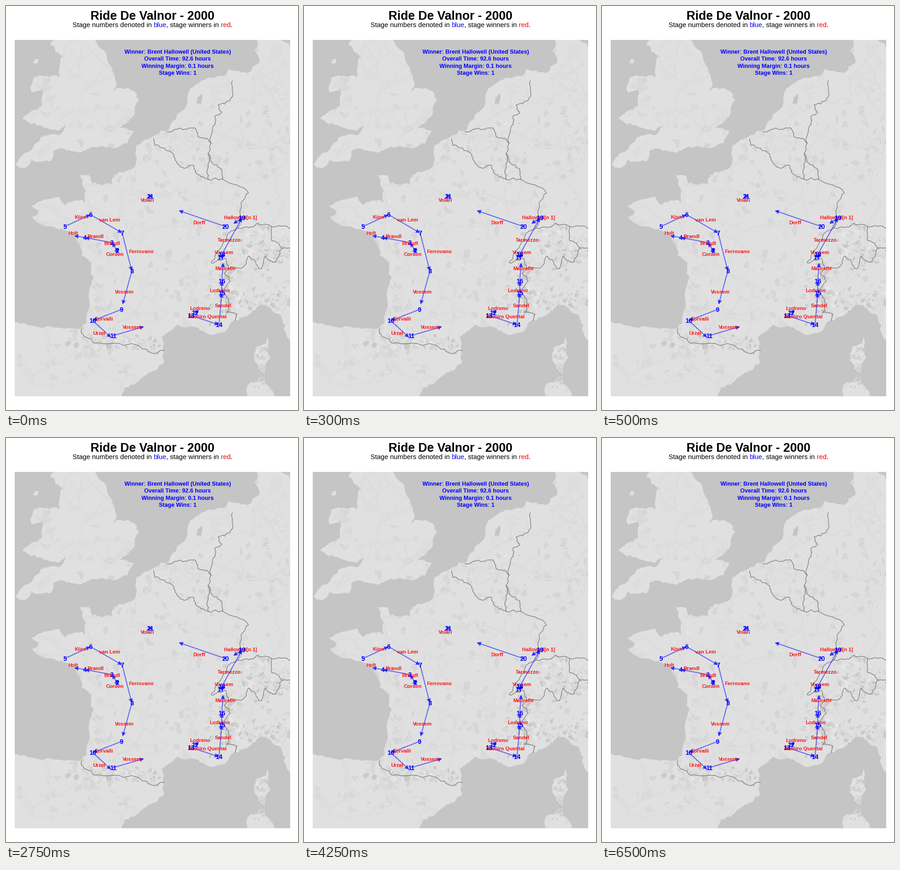
A matplotlib script for the animation above (8 s loop, 636 by 881 pixels).

```python
import numpy as np
import matplotlib.pyplot as plt
from matplotlib.animation import FuncAnimation
from matplotlib.collections import LineCollection, PolyCollection
from matplotlib.patches import PathPatch
from matplotlib.path import Path

W, H = 636, 881
SEA, LAND, BORDER = "#c5c5c5", "#e0e0e0", "#7b7b7b"
rng = np.random.default_rng(7)
plt.rcParams["font.family"] = "Liberation Sans"

# Coasts as (longitude, latitude)
BRITAIN = [
    (-1.3, 54.9), (-.4, 54.3), (.1, 53.6), (.34, 53.15), (.1, 52.85),
    (.5, 52.97), (1.4, 52.86), (1.74, 52.55), (1.3, 51.9), (.5, 51.5),
    (1.4, 51.38), (1, 50.92), (.3, 50.75), (-1.1, 50.8), (-2, 50.6),
    (-2.95, 50.72), (-3.45, 50.6), (-3.65, 50.22), (-4.75, 50.3),
    (-5.2, 49.96), (-5.7, 50.1), (-4.75, 50.67), (-4.2, 51.15), (-3, 51.25),
    (-2.7, 51.57), (-3.2, 51.4), (-4.3, 51.6), (-5.3, 51.85), (-4.1, 52.3),
    (-4.1, 52.9), (-4.7, 52.8), (-4.6, 53.35), (-3.1, 53.35), (-2.85, 54.1),
    (-3.6, 54.5), (-3.4, 54.9)]
NORTH = [
    (10.9, 54.3), (10, 54.75), (8.85, 54.75), (8.6, 54.3), (8.9, 53.87),
    (8.2, 53.5), (7.1, 53.65), (6.85, 53.42), (5.5, 53.25), (4.75, 52.95),
    (4.6, 52.45), (3.5, 51.45), (1.85, 50.96), (1.58, 50.87), (1.5, 50.1),
    (.2, 49.7), (.1, 49.35), (-1.1, 49.38), (-1.27, 49.69), (-1.9, 49.72),
    (-1.5, 48.63), (-2.3, 48.67), (-2.7, 48.52), (-3.1, 48.86),
    (-4.77, 48.5), (-4.3, 48.3), (-4.72, 48.04), (-4.35, 47.82)]
SOUTH = [
    (-2.7, 47.5), (-2.1, 47.2), (-1.75, 46.45), (-1.15, 46.2), (-1.2, 45.7),
    (-.72, 45.3), (-1.1, 45.5), (-1.45, 43.6), (-1.78, 43.37), (-3.8, 43.48),
    (-6, 43.65), (-6, 40), (.3, 40.1), (.85, 40.75), (2.15, 41.32),
    (3.2, 41.85), (3.05, 43), (3.95, 43.53), (5.35, 43.3), (5.95, 43.08),
    (6.6, 43.17), (7.2, 43.65), (8.1, 43.9), (8.9, 44.41), (10.2, 43.95),
    (10.55, 43), (10.9, 42.85)]
CORSICA = [(9.4, 43), (9.55, 42.1), (9.2, 41.37), (8.6, 41.95), (8.7, 42.55),
           (9.3, 42.7)]
SARDINIA = [(8.2, 40.88), (9.2, 41.25), (9.75, 40.5), (9.7, 40), (8.3, 40)]

# Frontiers in stage pixels
LOWLANDS = [
    [(493, 163), (488, 206), (462, 216), (470, 232), (455, 240), (456, 258),
     (447, 299), (440, 322), (452, 345), (470, 357), (472, 378)],
    [(351, 274), (385, 270), (413, 268), (418, 285), (440, 290), (447, 299)],
    [(322, 290), (324, 304), (364, 322), (368, 335), (380, 351), (408, 347),
     (412, 362), (441, 378), (472, 378), (528, 408), (510, 445), (505, 484)],
    [(440, 322), (440, 345), (441, 378)]]
ALPS = [
    [(505, 484), (483, 497), (455, 545), (447, 560), (477, 550), (484, 573),
     (476, 583), (488, 600), (470, 620), (485, 640), (480, 668), (503, 672),
     (500, 686)],
    [(505, 484), (538, 482), (548, 474), (578, 481), (622, 486)],
    [(484, 573), (511, 572), (530, 545), (556, 573), (565, 545), (588, 558),
     (603, 528), (622, 528)],
    [(578, 481), (579, 512), (603, 528)],
    [(165, 704), (172, 722), (193, 735), (266, 738), (315, 756), (345, 751)]]

HUBS = [(224, 270), (313, 408), (158, 225), (385, 290), (480, 285),
        (404, 580), (280, 676), (195, 800), (545, 150), (562, 578)]
# Woodland and relief: centre and spread
WOODS = [(319, 400, 170, 170), (90, 205, 18, 28), (205, 655, 16, 28),
         (425, 345, 25, 18), (560, 300, 45, 70), (360, 620, 35, 40),
         (130, 770, 90, 40)]
HILLS = [(560, 535, 38, 22), (485, 615, 14, 35), (545, 640, 45, 14),
         (240, 735, 55, 9), (560, 770, 11, 35)]

# Stage start, winner, place of the winner's name
ROUTE = [
    (242, 533, "Corden", 237, 541), (242, 533, "Brandl", 231, 517),
    (231, 516, "Brandl", 195, 502), (172, 505, "Holt", 146, 495),
    (128, 481, "Körn", 162, 460), (184, 455, "van Lem", 226, 466),
    (253, 495, "Ferrovano", 294, 535), (274, 578, "Vossem", 258, 623),
    (251, 662, "Corvalli", 213, 682), (189, 686, "Urzel", 203, 713),
    (233, 719, "Vossem", 275, 700), (412, 669, "Lodreno", 422, 659),
    (403, 675, "Ramiro Quental", 439, 677), (464, 695, "Sandel", 473, 653),
    (470, 626, "Lodreno", 465, 620), (470, 600, "Maurelle", 478, 572),
    (468, 548, "Vossem", 475, 537), (470, 542, "Tarmezzo", 486, 510),
    (514, 462, "Hallowell[n 1]", 511, 461), (478, 481, "Dorff", 421, 472),
    (314, 415, "Volari", 308, 423)]
# Finishes that are not the next start
FINISH = {1: (247, 534), 4: (148, 501), 8: (254, 651), 10: (229, 723),
          11: (301, 699), 12: (420, 663), 16: (473, 560), 17: (475, 541),
          19: (495, 475), 20: (376, 446), 21: (320, 415)}


def project(points):
    lon, lat = np.array(points, float).T
    merc = np.degrees(np.arcsinh(np.tan(np.radians(lat))))
    return np.c_[228 + 36.4 * lon, 2453.9 - 36.3 * merc]


def rough(points, amp=.12, depth=3):
    """Subdivide a line with small sideways shifts."""
    p = np.array(points, float)
    for _ in range(depth):
        d = np.diff(p, axis=0)
        shift = np.c_[-d[:, 1], d[:, 0]] * rng.normal(0, amp, (len(d), 1))
        out = np.empty((2 * len(p) - 1, 2))
        out[::2] = p
        out[1::2] = p[:-1] + d / 2 + np.clip(shift, -3, 3)
        p = out
    return p


def coast(points):
    p = project(points)
    return rough(np.vstack([p, p[:1]]))


def blob(x, y, r, n=11):
    a = np.linspace(0, 2 * np.pi, n, endpoint=False)
    rad = r * rng.uniform(.45, 1.25, n)
    turn, flat = rng.uniform(0, np.pi), rng.uniform(.4, .9)
    u, v = rad * np.cos(a), rad * np.sin(a) * flat
    c, s = np.cos(turn), np.sin(turn)
    return np.c_[x + u * c - v * s, y + u * s + v * c]


def scatter(spots, density, small, large, shades):
    shapes, tones = [], []
    for x, y, sx, sy in spots:
        for _ in range(int(density * np.sqrt(sx * sy))):
            shapes.append(blob(rng.normal(x, sx), rng.normal(y, sy),
                               rng.uniform(small, large)))
            tones.append(str(rng.choice(shades)))
    return PolyCollection(shapes, facecolors=tones, edgecolors="none")


def roads(land):
    towns = rng.uniform((19, 74), (619, 851), (460, 2))
    towns = towns[land.contains_points(towns)]
    nodes = np.vstack([HUBS, towns])
    links = set()
    for i, p in enumerate(nodes):
        dist = np.hypot(*(nodes - p).T)
        near = np.argsort(dist)[1:9 if i < len(HUBS) else 4]
        links |= {tuple(sorted((i, int(j)))) for j in near if dist[j] < 75}
    return [rough(nodes[list(k)], .07) for k in sorted(links)]


def draw_map(ax):
    ax.set_facecolor(SEA)
    shores = [coast(s) for s in (BRITAIN, NORTH + SOUTH, CORSICA, SARDINIA)]
    shores.append(blob(65, 121, 7))
    land = Path.make_compound_path(*[Path(s, closed=True) for s in shores])
    ground = ax.add_patch(PathPatch(land, fc=LAND, ec="#d2d2d2", lw=.6))
    lines = roads(land)
    layers = [scatter(WOODS, .9, 3, 11, [.835, .845, .855]),
              scatter(HILLS, 4.5, 2, 8, [.79, .82, .84, .86, .9]),
              scatter([(319, 450, 190, 220)], .45, 1, 4, [.9, .91]),
              LineCollection(lines, colors="#d2d2d2", linewidths=2.3),
              LineCollection(lines, colors="#e5e5e5", linewidths=1.1)]
    for layer in layers:
        ax.add_collection(layer, autolim=False)
        layer.set_clip_path(ground)
    for lake in [(422, 203, 13), (465, 545, 8), (571, 484, 7)]:
        ax.fill(*blob(*lake).T, color=SEA, lw=0, zorder=3)
    for line in LOWLANDS + ALPS:
        ax.plot(*rough(line, .13).T, color=BORDER, lw=1.3, zorder=4)


def label(ax, x, y, s, size, color="black", weight="bold", ha="center", **kw):
    ax.text(x, y + .36 * size, s, size=size, color=color, weight=weight,
            ha=ha, va="baseline", **kw)


def draw_route(ax):
    for n, (x, y, name, nx, ny) in enumerate(ROUTE, 1):
        end = FINISH[n] if n in FINISH else ROUTE[n][:2]
        ax.annotate("", end, (x, y), arrowprops=dict(
            arrowstyle="-|>,head_length=.65,head_width=.33", mutation_scale=10,
            color="blue", alpha=.55, lw=2, shrinkA=0, shrinkB=0,
            joinstyle="miter"))
        label(ax, nx, ny, name, 11.1, "red", alpha=.9, zorder=5)
        label(ax, x, y, str(n), 13.9, "blue", zorder=6)


def draw_titles(ax):
    label(ax, 319, 20.5, "Ride De Valnor - 2000", 26.67)
    parts = [(145.3, "Stage numbers denoted in", "black"), (321.5, "blue", "blue"),
             (349.3, ", stage winners in", "black"), (467.5, "red", "red"),
             (488.8, ".", "black")]
    for x, s, color in parts:
        label(ax, x, 41, s, 14.67, color, "normal", "left")
    facts = ["Winner: Brent Hallowell (United States)",
             "Overall Time: 92.6 hours", "Winning Margin: 0.1 hours",
             "Stage Wins: 1"]
    for i, s in enumerate(facts):
        label(ax, 374, 99 + 15.5 * i, s, 12.5, "blue")


# At 72 dpi one point is one pixel
fig = plt.figure(figsize=((W + .01) / 72, (H + .01) / 72), dpi=72, facecolor="white")
base = fig.add_axes([19 / W, 1 - 851 / H, 600 / W, 777 / H])
top = fig.add_axes([0, 0, 1, 1])
draw_map(base)
draw_route(top)
draw_titles(top)
base.set(xlim=(19, 619), ylim=(851, 74), xticks=[], yticks=[])
base.spines[:].set_visible(False)
top.set(xlim=(0, W), ylim=(H, 0))
top.axis("off")


def update(frame):
    # The season's summary is held for the whole loop
    return ()


anim = FuncAnimation(fig, update, frames=16, interval=500, repeat=True,
                     repeat_delay=0, blit=False)
plt.show()
```
